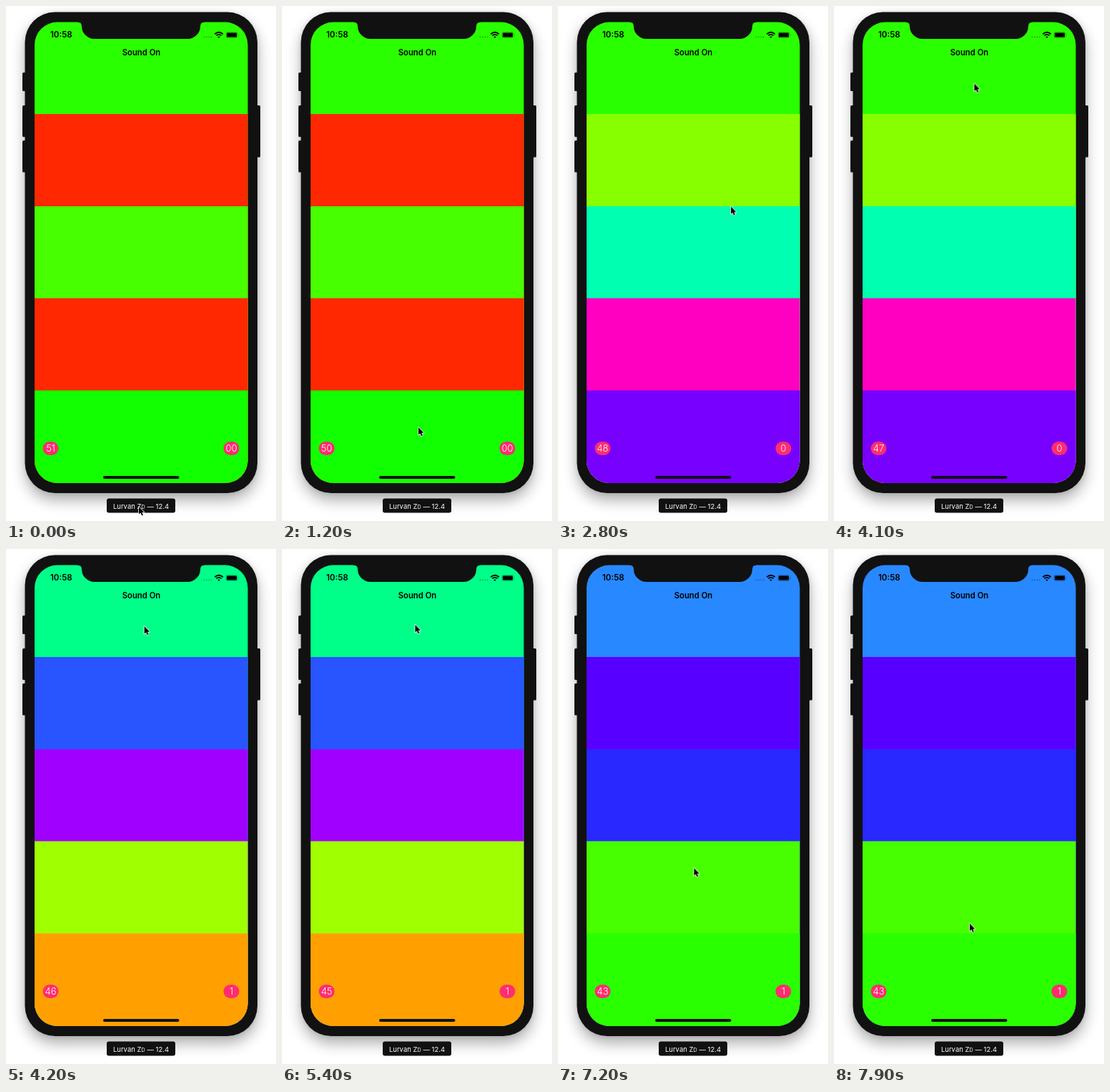
Write an HTML page that moves like this. It is 378x720 px and loops after 8 s.

```html
<!DOCTYPE html>
<html lang="en">
<head>
<meta charset="utf-8">
<title>Colour match game</title>
<style>
html, body { margin: 0; width: 100%; height: 100%; overflow: hidden; background: #fff; }
svg { display: block; }
#stage { position: absolute; left: 0; top: 0; }
.shadow {
  position: absolute; left: 27px; top: 9px; width: 325px; height: 672px;
  border-radius: 42px; box-shadow: 0 10px 20px rgba(0,0,0,.32), 0 0 6px rgba(0,0,0,.12);
}
text { font-family: Inter, Roboto, sans-serif; text-anchor: middle; }
.bold { font-weight: 600; }
.badge { fill: #ff2d70; }
.count { fill: #fff; font-size: 13px; font-weight: 300; }

/* one 8 s clock for everything */
.rounds, .time, .score { animation: 8s step-end infinite; }
.rounds { animation-name: rounds; }
.time { animation-name: time; }
.score { animation-name: score; }
.cursor { animation: cursor 8s linear infinite; }

@keyframes rounds {
  0%     { --a: #2aff00; --b: #ff2800; --c: #48ff00; --d: #ff2800; --e: #11ff00; }
  20%    { --a: #2aff00; --b: #88ff00; --c: #00ffb0; --d: #ff00c0; --e: #7700ff; }
  52.5%  { --a: #00ff88; --b: #2855ff; --c: #a000ff; --d: #a0ff00; --e: #ffa000; }
  68.75% { --a: #2828ff; --b: #11ff00; --c: #11ff00; --d: #2828ff; --e: #00ff48; }
  88.75%, 100% { --a: #2888ff; --b: #5800ff; --c: #2828ff; --d: #48ff00; --e: #2aff00; }
}
@keyframes time {
  0%     { transform: translateY(0); }
  6.25%  { transform: translateY(-20px); }
  18.75% { transform: translateY(-40px); }
  30%    { transform: translateY(-60px); }
  41.25% { transform: translateY(-80px); }
  52.5%  { transform: translateY(-100px); }
  63.75% { transform: translateY(-120px); }
  76.25% { transform: translateY(-140px); }
  87.5%, 100% { transform: translateY(-160px); }
}
@keyframes score {
  0%    { transform: translateY(0); }
  20%   { transform: translateY(-20px); }
  52.5%, 100% { transform: translateY(-40px); }
}
@keyframes cursor {
  0%             { transform: translate(186px, 700px); }
  2.5%, 3.75%    { transform: translate(187px, 687px); }
  10%            { transform: translate(190px, 622px); }
  15%, 31.25%    { transform: translate(191px, 589px); }
  33.75%         { transform: translate(230px, 400px); }
  35%            { transform: translate(242px, 281px); }
  36.25%         { transform: translate(252px, 215px); }
  37.5%          { transform: translate(224px, 142px); }
  38.75%         { transform: translate(212px, 110px); }
  40%            { transform: translate(204px, 96px); }
  42.5%, 51.25%  { transform: translate(196.5px, 108.5px); }
  55%            { transform: translate(188px, 107px); }
  57.5%, 72.5%   { transform: translate(186.5px, 106px); }
  76.25%         { transform: translate(192px, 225px); }
  80%            { transform: translate(197.5px, 341.5px); }
  82.5%, 86.25%  { transform: translate(194px, 425px); }
  92.5%, 96.25%  { transform: translate(188px, 460px); }
  98.75%, 100%   { transform: translate(190px, 523.5px); }
}
</style>
</head>
<body>
<div class="shadow"></div>
<svg id="stage" width="378" height="720" viewBox="0 0 378 720">
  <defs>
    <clipPath id="glass"><rect x="40" y="22.5" width="298.5" height="644.5" rx="32"/></clipPath>
  </defs>

  <!-- phone body and side buttons -->
  <g fill="#111">
    <rect x="23" y="93" width="8" height="26" rx="1.5"/>
    <rect x="23" y="139" width="8" height="44" rx="1.5"/>
    <rect x="23" y="188" width="8" height="44.5" rx="1.5"/>
    <rect x="348" y="139" width="8" height="72.5" rx="1.5"/>
    <rect x="26.5" y="8.5" width="325.5" height="672.5" rx="42"/>
  </g>

  <!-- colour bands -->
  <g class="rounds" clip-path="url(#glass)">
    <rect x="40" y="22" width="299" height="645" fill="var(--a)"/>
    <rect x="40" y="151" width="299" height="516" fill="var(--b)"/>
    <rect x="40" y="280" width="299" height="387" fill="var(--c)"/>
    <rect x="40" y="408.5" width="299" height="259" fill="var(--d)"/>
    <rect x="40" y="537.5" width="299" height="130" fill="var(--e)"/>
  </g>

  <path fill="#111" d="M100 21V22.5Q106 22.5 106 28.500A18 17.500 0 0 0 124 46H254A18 17.500 0 0 0 272 28.500Q272 22.500 278 22.500V21Z"/>

  <!-- status bar -->
  <text class="bold" x="77.300" y="44.300" font-size="11.600">10:58</text>
  <g fill="#000" opacity=".35">
    <circle cx="277.500" cy="43.300" r=".9"/><circle cx="280.900" cy="43.300" r=".9"/>
    <circle cx="284.300" cy="43.300" r=".9"/><circle cx="287.700" cy="43.300" r=".9"/>
  </g>
  <g fill="none" stroke="#000" stroke-width="1.800">
    <path d="M292.300 39.200Q298 34.300 303.700 39.200"/>
    <path d="M294.400 41.400Q298 38.300 301.600 41.400"/>
  </g>
  <path d="M296.200 43.100Q298 41.700 299.800 43.100L298 45Z"/>
  <rect x="308" y="36.700" width="16" height="7.600" rx="2" fill="none" stroke="#000" stroke-opacity=".4" stroke-width=".8"/>
  <rect x="309" y="37.600" width="14" height="5.900" rx="1.200"/>
  <path d="M325 39.200Q326.300 40.500 325 41.800Z" opacity=".5"/>

  <text class="bold" x="189.500" y="69.300" font-size="11.300">Sound On</text>

  <!-- countdown and score -->
  <rect class="badge" x="51.500" y="609" width="22" height="19" rx="9.500"/>
  <svg x="51.500" y="609" width="22" height="19" overflow="hidden">
    <g class="time count">
      <text x="11" y="14.200">51</text><text x="11" y="34.200">50</text>
      <text x="11" y="54.200">49</text><text x="11" y="74.200">48</text>
      <text x="11" y="94.200">47</text><text x="11" y="114.200">46</text>
      <text x="11" y="134.200">45</text><text x="11" y="154.200">44</text>
      <text x="11" y="174.200">43</text>
    </g>
  </svg>
  <rect class="badge" x="304.500" y="609" width="22" height="19" rx="9.500"/>
  <svg x="304.500" y="609" width="22" height="19" overflow="hidden">
    <g class="score count">
      <text x="11" y="14.200">00</text><text x="11" y="34.200">0</text>
      <text x="11" y="54.200">1</text>
    </g>
  </svg>

  <rect x="136" y="657" width="106.500" height="4" rx="2" fill="#111"/>

  <!-- device label -->
  <rect x="141" y="688.500" width="96" height="20" rx="3" fill="#111"/>
  <text x="189" y="702.600" font-size="9.500" fill="#fff">Lurvan Z<tspan font-size="7.200">D</tspan> — 12.4</text>

  <g class="cursor">
    <path d="M0 0V10.600L2.400 8.400L4.100 12.200L5.900 11.400L4.300 7.700H7.500Z" stroke="#fff" stroke-width="1.500" stroke-linejoin="round" paint-order="stroke"/>
  </g>
</svg>
</body>
</html>
```
